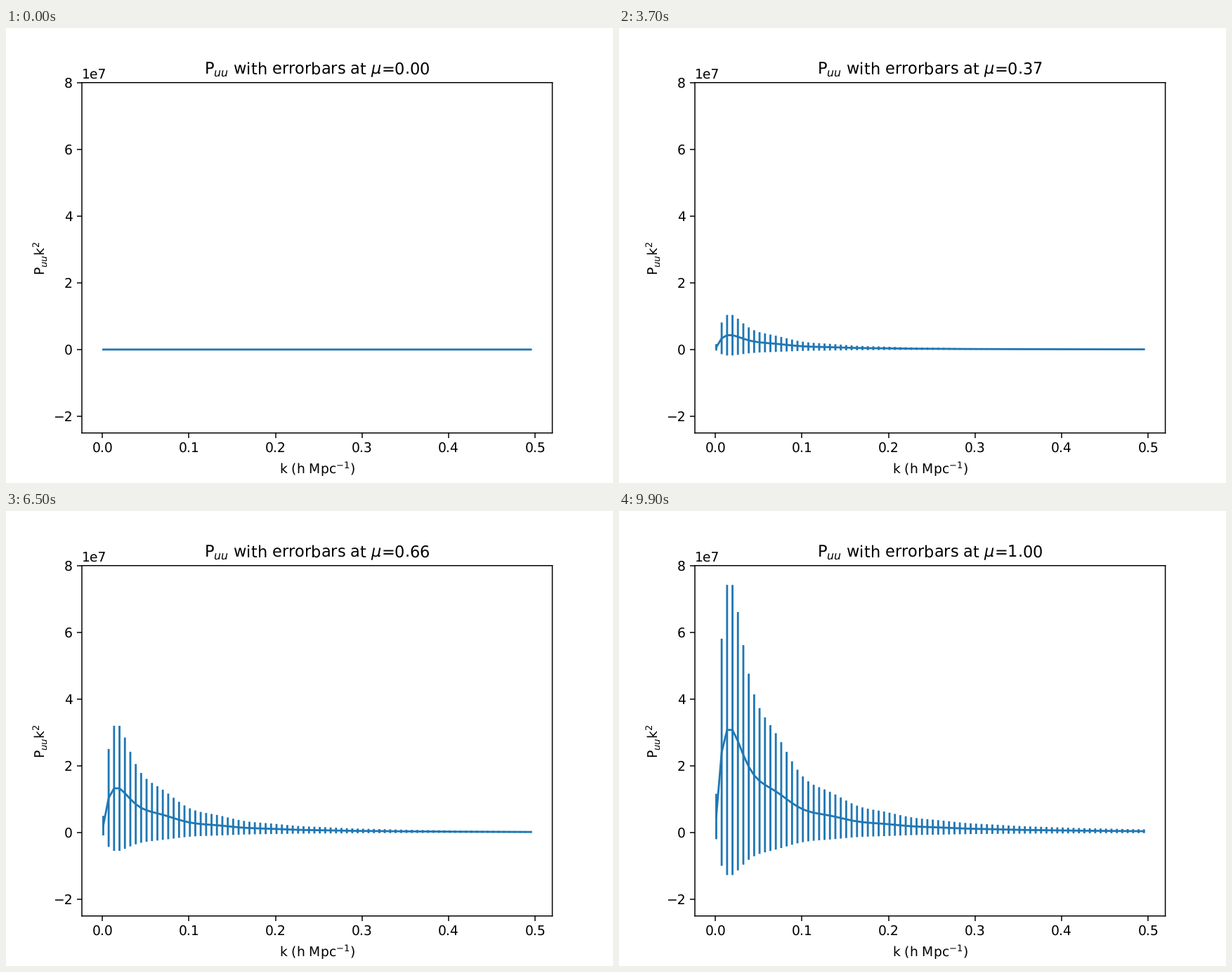
Animation of 864 by 648 pixels, one loop 10 s. Source, as a matplotlib script:

```python
import numpy as np
import matplotlib.pyplot as plt
from matplotlib.animation import FuncAnimation

FRAMES = 100
OMEGA_M, HUBBLE = 0.3, 0.7
SOUND = 102.0  # sound horizon in Mpc/h
ALPHA = 0.799  # baryon suppression of the shape parameter


def transfer(k):
    """Smooth Eisenstein-Hu transfer function, k in h/Mpc."""
    shape = ALPHA + (1 - ALPHA) / (1 + (0.43 * k * SOUND) ** 4)
    q = 1.02 * k / (OMEGA_M * HUBBLE * shape)
    log = np.log(2 * np.e + 1.8 * q)
    return log / (log + (14.2 + 731 / (1 + 62.5 * q)) * q**2)


def wiggles(k):
    """Damped baryon oscillations that fade out on large scales."""
    size = 0.1 * np.exp(-k / 0.16) / (1 + (0.03 / k) ** 4)
    return 1 + size * np.sin(100.5 * k + 0.3)


def power(k):
    return 3.779e9 * k**0.96 * transfer(k) ** 2 * wiggles(k)


# Lines keep their sub-pixel positions, as in a smoothly scaled plot
plt.rcParams.update({
    "path.snap": False,
    "text.hinting": "none",
    "xtick.major.pad": 3.0,
})

K = np.linspace(0.00098, 0.495, 80)
POWER = power(K)

fig, ax = plt.subplots(figsize=(6.4, 4.8), dpi=135)
line, _, (bars,) = ax.errorbar(K, POWER, yerr=np.sqrt(2) * POWER)
pad = 0.05 * np.ptp(K)
ax.set_xlim(K[0] - pad, K[-1] + pad)
ax.set_ylim(-2.5e7, 8e7)
ax.set_xlabel("k (h Mpc$^{-1}$)")
ax.set_ylabel("P$_{uu}$k$^2$", labelpad=3.4)
ax.yaxis.OFFSETTEXTPAD = 2.5
title = ax.set_title("")


def update(i):
    mu = i / (FRAMES - 1)
    p = POWER * mu**2
    err = np.sqrt(2) * p
    line.set_ydata(p)
    bars.set_segments([[(k, lo), (k, hi)] for k, lo, hi in zip(K, p - err, p + err)])
    title.set_text(rf"P$_{{uu}}$ with errorbars at $\mu$={mu:.2f}")
    return line, bars, title


anim = FuncAnimation(fig, update, frames=FRAMES, interval=100, repeat=True, repeat_delay=0)
plt.show()
```
